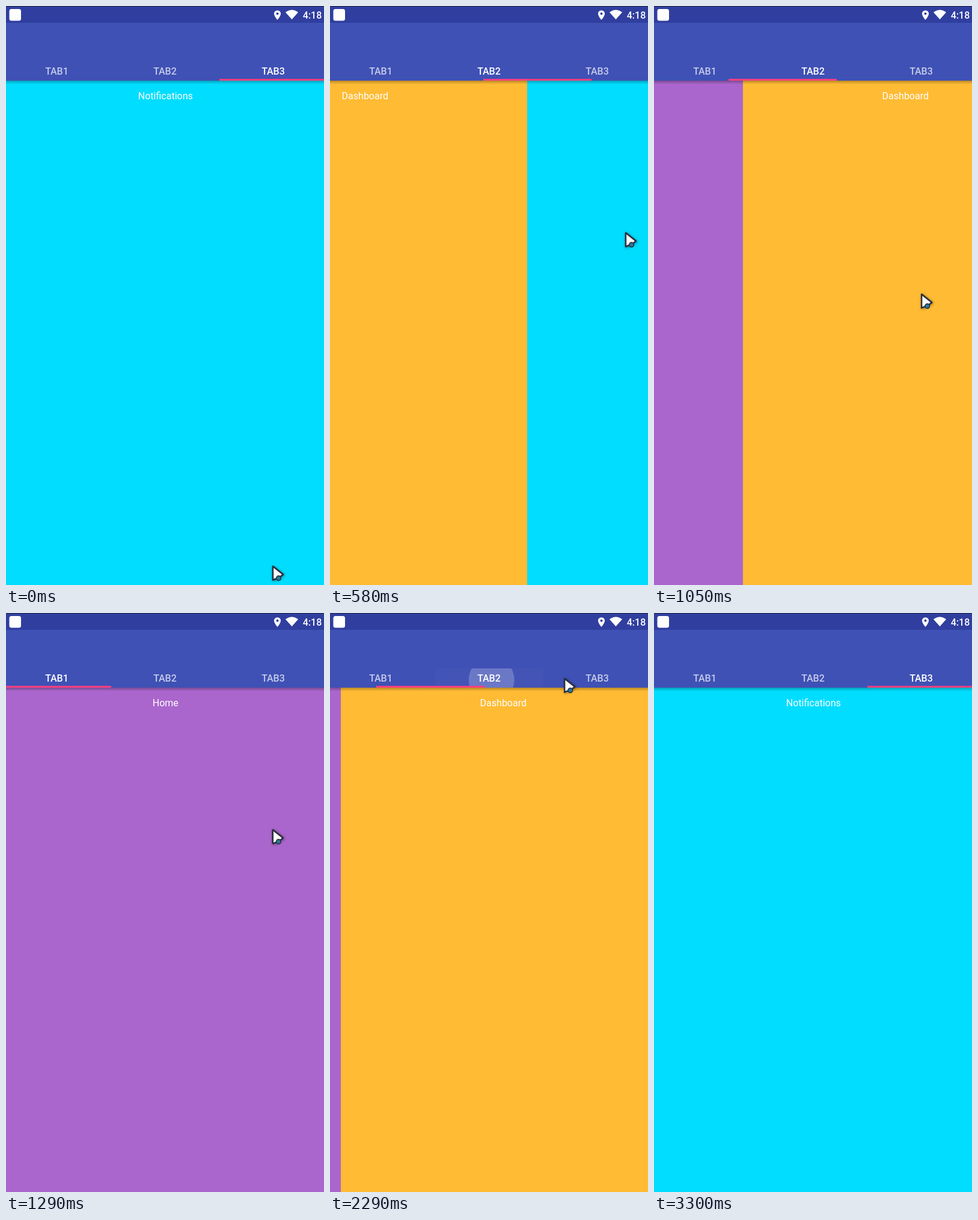
Animation of 529x962 px, one loop 3.84 s. Source, as an HTML page with a canvas:

```html
<!DOCTYPE html>
<html lang="en">
<head>
<meta charset="utf-8">
<title>Tabs</title>
<style>
html, body { margin: 0; width: 100%; height: 100%; overflow: hidden; background: #3f51b5; }
canvas { display: block; }
</style>
</head>
<body>
<canvas id="stage" width="529" height="962"></canvas>
<script>
const ctx = document.getElementById('stage').getContext('2d');
const LOOP = 3840, STEP = 77.7, PHASE = 580, TOLERANCE = 7;
const WIDTH = 529, HEIGHT = 962;
const PAGE = 540, TAB = 180, LEFT = -5, TAB_TOP = 92, BAR = 124;
const RIPPLE_LIFE = 460;
const pages = [['Home', '#aa66cc'], ['Dashboard', '#ffbb33'], ['Notifications', '#00ddff']];

// Two swipes back, then two taps forward; the tab line starts apart from the page.
const moves = [
  { by: -1, scroll: 406.5, line: 418.9 },
  { by: -1, scroll: 940.9, line: 940.9 },
  { by: 1, scroll: 2205.2, line: 2148.3, tap: { tab: 1, x: 272, y: 111 } },
  { by: 1, scroll: 2680.9, line: 2676.4, tap: { tab: 2, x: 430, y: 105 } }
];

// Cursor stops: [time, x, y]
const stops = [[70, 443, 930], [380, 160, 400], [580, 491, 376], [890, 275, 485],
  [1046, 444, 478], [1130, 510, 470], [1668, 268, 71], [1746, 265, 95], [1901, 265, 95],
  [1978, 272, 111], [2212, 272, 111], [2289, 389, 108], [2367, 430, 106], [2678, 430, 106],
  [2755, 429, 250], [3210, 518, 956]];

const clamp = u => Math.min(1, Math.max(0, u));
const smooth = u => u * u * (3 - 2 * u);
const quint = u => 1 - (1 - u) ** 5;

// The screen refreshes on a fixed beat.
const snap = t => Math.max(0, PHASE + STEP * Math.floor((t - PHASE + TOLERANCE) / STEP));

const linePos = t => moves.reduce((pos, m) => pos + m.by * smooth(clamp((t - m.line) / 300)), 2);

const pagePos = t => moves.reduce((pos, m) => {
  const age = t - m.scroll;
  return pos + m.by * (m.tap ? quint(clamp(age / 180)) : smooth(clamp(age / 300)));
}, 2);

function cursorAt(t) {
  const next = Math.max(1, stops.findIndex(s => s[0] > t));
  const [t0, x0, y0] = stops[next - 1], [t1, x1, y1] = stops[next];
  const k = clamp((t - t0) / (t1 - t0));
  return [x0 + (x1 - x0) * k, y0 + (y1 - y0) * k];
}

function rect(color, x, y, w, h) {
  ctx.fillStyle = color;
  ctx.fillRect(x, y, w, h);
}

function circle(color, x, y, r) {
  ctx.fillStyle = color;
  ctx.beginPath();
  ctx.arc(x, y, r, 0, 7);
  ctx.fill();
}

function label(text, x, y, weight = 400, color = '#fff') {
  ctx.font = weight + ' 16px Roboto, sans-serif';
  ctx.textAlign = 'center';
  ctx.fillStyle = color;
  ctx.fillText(text, x, y);
}

function drawPages(pos) {
  pages.forEach(([name, color], i) => {
    const x = Math.round((i - pos) * PAGE);
    rect(color, LEFT + x, BAR, PAGE, HEIGHT - BAR);
    label(name, 265.3 + x, 154.5);
  });
  const shade = ctx.createLinearGradient(0, BAR, 0, BAR + 6);
  shade.addColorStop(0, 'rgba(0,0,0,.28)');
  shade.addColorStop(1, 'rgba(0,0,0,0)');
  rect(shade, 0, BAR, WIDTH, 6);
}

function drawStatus() {
  rect('#303f9f', 0, 0, WIDTH, 28);
  rect('#1b2040', 0, 0, WIDTH, 1);
  ctx.fillStyle = '#fff';
  ctx.beginPath();
  ctx.roundRect(5.5, 5, 19.5, 19.5, 3.5);
  ctx.fill();
  ctx.fill(new Path2D('M451.5 7.2a5.6 5.6 0 0 1 5.6 5.6c0 4-5.6 10.4-5.6 10.4s-5.6-6.4-5.6-10.4a5.6 5.6 0 0 1 5.6-5.6z'));
  ctx.fill(new Path2D('M475.5 22.3L465 10.4Q475.5 2.8 486 10.4z'));
  circle('#303f9f', 451.5, 12.8, 2);
  label('4:18', 509.5, 21, 500);
}

function drawRipple({ tab, x, y }, age) {
  if (age < 0 || age > RIPPLE_LIFE) return;
  const left = LEFT + tab * TAB, height = BAR - TAB_TOP;
  const drift = (left + TAB / 2 - x) * clamp(age / 300);
  ctx.save();
  ctx.beginPath();
  ctx.rect(left, TAB_TOP, TAB, height);
  ctx.clip();
  ctx.globalAlpha = clamp((RIPPLE_LIFE - age) / 220);
  rect('rgba(255,255,255,.02)', left, TAB_TOP, TAB, height);
  circle('rgba(255,255,255,.21)', x + drift, y, age ** 1.2 / 10);
  ctx.restore();
}

function drawTabs(pos, t) {
  rect('#3f51b5', 0, 28, WIDTH, BAR - 28);
  moves.forEach(m => m.tap && drawRipple(m.tap, t - m.line));
  pages.forEach((_, i) => {
    const color = i === Math.round(pos) ? '#fff' : 'rgba(255,255,255,.7)';
    label('TAB' + (i + 1), 84.5 + i * TAB, 114, 500, color);
  });
  rect('#ff4081', Math.round(LEFT + linePos(t) * TAB), BAR - 3, TAB, 3);
}

function drawCursor(x, y) {
  const arrow = new Path2D('M1 1L18 14.5L11 20L1 23.5z');
  ctx.save();
  ctx.translate(x, y);
  ctx.lineJoin = 'round';
  ctx.lineWidth = 2.4;
  ctx.strokeStyle = '#29303f';
  ctx.shadowColor = 'rgba(0,0,0,.5)';
  ctx.shadowBlur = 4;
  ctx.shadowOffsetX = ctx.shadowOffsetY = 1;
  ctx.stroke(arrow);
  ctx.shadowColor = 'transparent';
  ctx.fillStyle = '#fff';
  ctx.fill(arrow);
  ctx.stroke(arrow);
  circle('#29303f', 10.5, 20.7, 4.6);
  circle('#2a7a9c', 10.5, 20.7, 3);
  ctx.restore();
}

function draw(now) {
  const t = snap(now % LOOP), pos = pagePos(t);
  drawPages(pos);
  drawStatus();
  drawTabs(pos, t);
  if (t < 3250) drawCursor(...cursorAt(Math.min(t, 3209)));
}

const start = performance.now();
function frame() {
  draw(performance.now() - start);
  requestAnimationFrame(frame);
}
frame();
</script>
</body>
</html>
```
